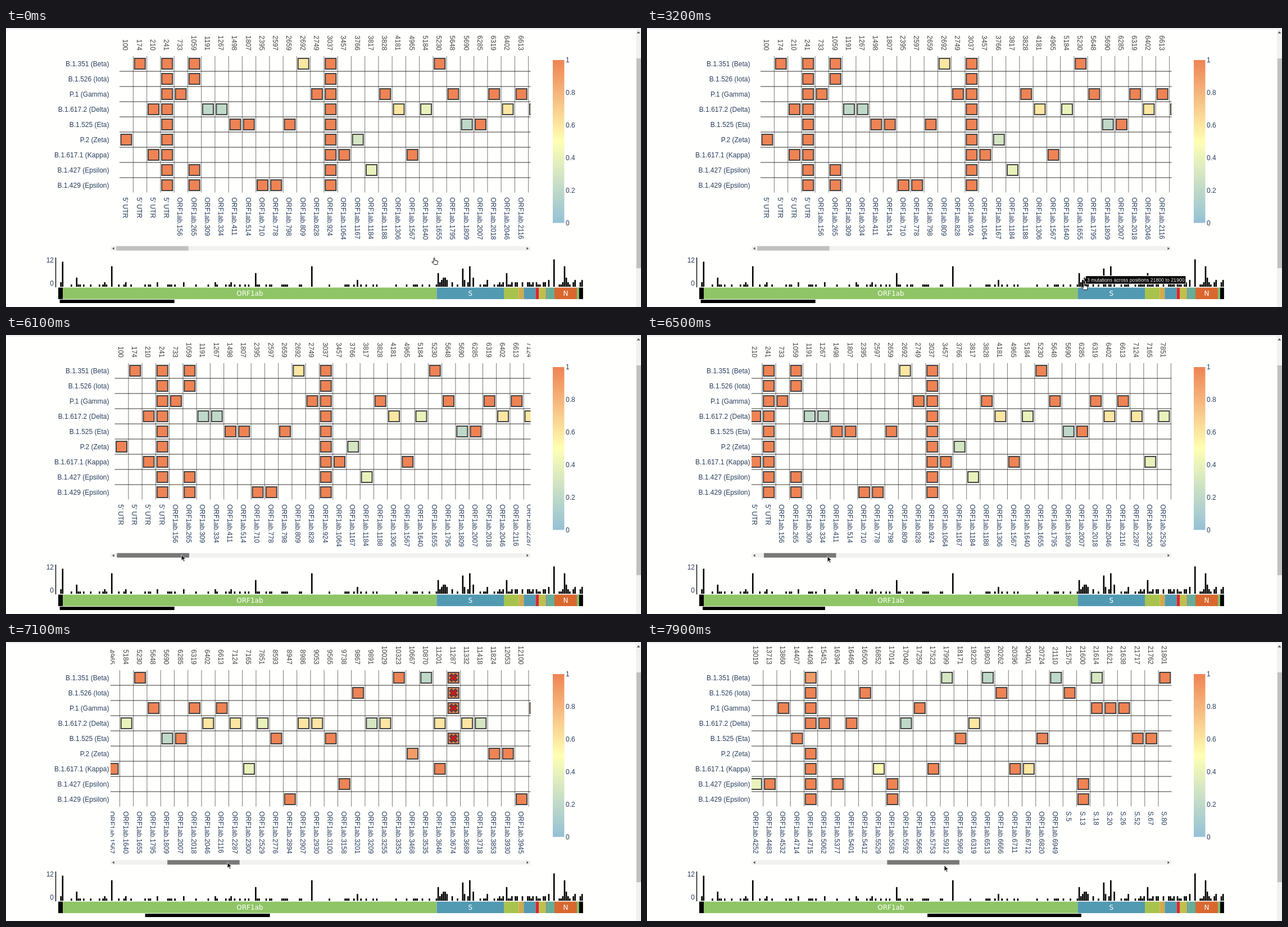
An HTML page for the animation above (8000 ms loop, 1130x496 px).

```html
<!DOCTYPE html>
<html lang="en">
<head>
<meta charset="utf-8">
<title>Mutation heatmap</title>
<style>
  html, body { margin: 0; width: 100%; height: 100%; overflow: hidden; background: #fffffd; }
  svg { display: block; font: 12px "Liberation Sans", Arial, sans-serif; fill: #2a3f5f; }
  .end { text-anchor: end; }
  .gene { text-anchor: middle; fill: #fff; font-family: "DejaVu Sans", sans-serif; }
  .pos { fill: #444; }
  .cell { stroke: #444; stroke-width: 2; }
  .cross { fill: #dc1414; stroke: #444; stroke-width: 1.8; }
  .col { stroke: #777; }
  .row { stroke: #333; }
  .track { fill: #f1f1f1; }
  .arrow { fill: #505050; }
  #tip path { fill: #000; stroke: #fff; }
  #tip text { fill: #fff; font-size: 8.75px; }
  #hand { fill: #fff; stroke: #111; }
  #pointer { fill: #111; stroke: #fff; stroke-width: .8; }
</style>
</head>
<body>
<svg width="1130" height="496" viewBox="0 0 1130 496">
  <defs>
    <clipPath id="view"><rect x="186" y="0" width="747.5" height="386"/></clipPath>
    <linearGradient id="scale" x1="0" y1="0" x2="0" y2="1">
      <stop offset="0" stop-color="#ef8354"/>
      <stop offset=".5" stop-color="#ffffb4"/>
      <stop offset="1" stop-color="#94c0d6"/>
    </linearGradient>
  </defs>
  <rect y="1" width="1121" height="1" fill="#ddd"/>
  <rect class="track" x="1121" width="9" height="496"/>
  <rect x="1122" y="54" width="8" height="373" fill="#c1c1c1"/>
  <path class="arrow" d="M1122.5 9.5l3-3.5 3 3.5z"/>
  <g id="names"></g>
  <g clip-path="url(#view)"><g id="grid"></g></g>
  <rect x="973" y="57" width="20.5" height="289.5" fill="url(#scale)"/>
  <g id="ticks"></g>
  <rect class="track" x="186" y="387.7" width="747" height="8"/>
  <path class="arrow" d="M192.5 389.5v5l-3.5-2.5zM926.5 389.5v5l3.5-2.5z"/>
  <rect id="thumb" y="387.7" width="128.5" height="8"/>
  <text class="end" x="85" y="417">12</text>
  <text class="end" x="85" y="457.5">0</text>
  <path d="M88.5 408V461" stroke="#111" stroke-width="1.5"/>
  <g id="bars"></g>
  <g id="genes"></g>
  <rect id="span" y="483" height="6" fill="#000"/>
  <g id="tip">
    <path d="M0 0l3.5-3v-4.2h178.5v14.4h-178.5v-4.2z"/>
    <text x="6" y="3.2"></text>
  </g>
  <path id="hand" d="M4 7.5V1.6a1 1 0 0 1 2 0V5.2l4 .7q1.8.3 1.6 2l-.6 2.4-.8 2.2H5L1 8.3q-.4-1.1.9-1L4 8.6z"/>
  <path id="pointer" d="M0 0V10.5L2.5 8.2 4.2 12 6 11.2 4.3 7.5H7.5z"/>
</svg>
<script>
const $ = id => document.getElementById(id);

const lineages = ["B.1.351 (Beta)", "B.1.526 (Iota)", "P.1 (Gamma)", "B.1.617.2 (Delta)", "B.1.525 (Eta)",
  "P.2 (Zeta)", "B.1.617.1 (Kappa)", "B.1.427 (Epsilon)", "B.1.429 (Epsilon)"];

// position:lineages (a-i); a digit gives the frequency in tenths, x marks a deletion
const columns = `100:f 174:a 210:dg 241:abcdefghi 733:c 1059:abhi 1191:d2 1267:d2 1498:e 1807:e
  2395:i 2597:i 2659:e 2692:a6 2749:c 3037:abcdefghi 3457:g 3766:f3 3817:h4 3828:c
  4181:d6 4965:g 5184:d4 5230:a 5648:c 5690:e2 6285:e 6319:c 6402:d6 6613:c
  7124:d6 7165:g4 7851:d4 8593:e 8947:i 8986:d6 9053:d6 9565:e 9738:h 9867:b
  9891:d3 10029:d6 10323:a 10667:f9 10870:a2 11201:d6g 11287:axbxcxex 11332:d6 11418:d3 11824:f
  12053:f 12100:i 12778:c 12878:i 12964:f9 13019:h4 13713:h 13860:c 14407:e 14408:a9bcdfghi
  15451:d 16394:h 16466:d 16500:b 16852:g5 17014:hi 17040:d2 17259:c 17523:g 17999:a3
  18171:e 19220:d6 19803:a2 20262:b 20396:g 20401:g6 20724:e 21110:a2 21575:b 21600:hi
  21614:a3c 21621:c 21638:c 21717:e 21762:e 21801:a`.split(/\s+/).map(entry => {
    const [pos, list] = entry.split(":");
    const cells = [...list.matchAll(/([a-i])(\d?)(x?)/g)].map(([, row, tenths, cross]) =>
      ({ row: row.charCodeAt(0) - 97, value: tenths ? tenths / 10 : 1, cross }));
    return { pos: +pos, cells };
  });

// each gene runs from the end of the one before
const genes = [[266, "#000"], [21563, "#8fc566", "ORF1ab"], [25393, "#5299b2", "S"], [26245, "#a8c34d"],
  [26523, "#d3a94a"], [27202, "#5299b2"], [27394, "#d42a2e"], [27770, "#bfc04c"], [27894, "#7b9f8f"],
  [28274, "#63ae98"], [29558, "#d9682f", "N"], [29680, "#7fbf6f"], [29903, "#000"]];

const peaks = { 218: 3, 219: 4, 220: 4, 221: 3, 230: 8, 234: 9, 236: 4, 255: 6, 282: 12, 288: 9, 289: 4 };
const LAST_BIN = 298;

const STEP = 24.25, LEFT = 214, TOP = 63.5, ROW = 27, SHOWN = 30;
const genomeX = pos => 93 + pos * 0.03123;
const rowY = i => TOP + i * ROW;
const barTop = n => 460 - 4.05 * n;
const clamp = k => Math.min(1, Math.max(0, k));
const mix = (a, b, k) => a + (b - a) * k;

function colour(v) {
  const low = [148, 192, 214], mid = [255, 255, 180], high = [239, 131, 84];
  const [a, b, k] = v < .5 ? [low, mid, v * 2] : [mid, high, v * 2 - 1];
  return `rgb(${a.map((c, i) => Math.round(mix(c, b[i], k)))})`;
}

function site(pos) {
  if (pos < 266) return "5' UTR";
  const [name, start] = pos < 21563 ? ["ORF1ab", 266] : ["S", 21563];
  return `${name}.${Math.floor((pos - start) / 3) + 1}`;
}

const rect = (x, y, w, h, fill) => `<rect x="${x}" y="${y}" width="${w}" height="${h}" fill="${fill}"/>`;
const turned = (x, y, cls, text) => `<text class="${cls}" transform="translate(${x} ${y}) rotate(90)">${text}</text>`;

function cellMark({ row, value, cross }, x) {
  const plus = "M-2.4-7.2h4.8v4.8h4.8v4.8h-4.8v4.8h-4.8v-4.8h-4.8v-4.8h4.8z";
  return `<g transform="translate(${x} ${rowY(row)})">
    <rect class="cell" x="-9.5" y="-9.5" width="19" height="19" fill="${colour(value)}"/>
    ${cross && `<path class="cross" transform="rotate(45)" d="${plus}"/>`}</g>`;
}

function drawGrid() {
  const rules = columns.map((_, i) => `<path class="col" d="M${LEFT + 12.4 + i * STEP} 50V292.5"/>`);
  const lines = lineages.slice(1).map((_, i) => `<path class="row" d="M202 ${rowY(i + .5)}h${columns.length * STEP}"/>`);
  const marks = columns.map(({ pos, cells }, i) => {
    const x = LEFT + i * STEP;
    return cells.map(c => cellMark(c, x)).join("")
      + turned(x - 5.6, 40, "end pos", pos) + turned(x - 5.6, 301, "", site(pos));
  });
  $("grid").innerHTML = [...rules, ...lines, ...marks].join("");
}

function countBins() {
  const bins = Array(LAST_BIN + 1).fill(0);
  for (const { pos, cells } of columns) bins[Math.floor(pos / 100)] += cells.length;
  let seed = 7;
  const random = () => (seed = seed * 16807 % 2147483647) / 2147483647;
  for (let bin = 218; bin <= LAST_BIN; bin++) {
    const small = random() < .55 ? 1 + Math.floor(random() * 2.2) : 0;
    bins[bin] = peaks[bin] || small;
  }
  return bins;
}

function drawGenes() {
  let x = genomeX(0);
  $("genes").innerHTML = genes.map(([end, fill, name]) => {
    const from = x, w = genomeX(end) - x;
    x += w;
    return rect(from, 461.5, w, 20.5, fill)
      + (name ? `<text class="gene" x="${from + w / 2}" y="475.5">${name}</text>` : "");
  }).join("");
}

const counts = countBins();
$("bars").innerHTML = counts.map((n, bin) =>
  rect(genomeX(bin * 100 + 50) - 1.3, barTop(n), 2.6, 460 - barTop(n), "#000")).join("");
$("names").innerHTML = lineages.map((n, i) => `<text class="end" x="183.5" y="${rowY(i) + 4}">${n}</text>`).join("");
$("ticks").innerHTML = [1, .8, .6, .4, .2, 0].map(v => `<text x="996" y="${350.7 - v * 289.5}">${v}</text>`).join("");
drawGrid();
drawGenes();

// from ms, to ms, x, y reached
const moves = [[200, 400, 752, 421], [500, 900, 763, 452], [1000, 1100, 764, 453], [1400, 1500, 766, 454],
  [1700, 2100, 769.5, 453], [2400, 2800, 772.7, 453], [3400, 3500, 774, 453], [3900, 4000, 775, 453],
  [4500, 4600, 746.5, 429.5], [4600, 4900, 580, 399], [5000, 5600, 315, 389], [5700, 5900, 311, 390]];

// ms, cursor x, cursor y, scroll
const drag = [[6000, 311, 390, 0], [6500, 321, 393, 70], [7100, 394, 391.5, 533.2],
  [7600, 497, 398.5, 1114.2], [7900, 529, 397, 1353.4]];

function moved(t) {
  return moves.reduce(([x, y], [from, to, nx, ny]) => {
    const k = clamp((t - from) / (to - from));
    return [mix(x, nx, k), mix(y, ny, k)];
  }, [757, 408]);
}

// smooth curve through the keys
function glide(keys, t) {
  const last = keys.length - 1;
  const i = Math.min(last, Math.max(1, keys.findIndex(k => k[0] > t) + 1 || last + 1) - 1) || 1;
  const a = keys[i - 1], b = keys[i], len = b[0] - a[0];
  const u = clamp((t - a[0]) / len);
  const slope = (n, c) => {
    const p = keys[Math.max(0, n - 1)], q = keys[Math.min(last, n + 1)];
    return (q[c] - p[c]) / (q[0] - p[0]) * len;
  };
  return a.slice(1).map((v, j) => mix(v, b[j + 1], u * u * (3 - 2 * u))
    + u * (1 - u) * ((1 - u) * slope(i - 1, j + 1) - u * slope(i, j + 1)));
}

const place = (id, x, y) => $(id).setAttribute("transform", `translate(${x} ${y})`);
const show = (id, on) => $(id).style.display = on ? "" : "none";

function render(t) {
  const onChart = t < 4900;
  const [dragX, dragY, scroll] = glide(drag, t);
  const [x, y] = t < 6000 ? moved(t) : [dragX, dragY];
  place(onChart ? "hand" : "pointer", x, y);
  show("hand", onChart);
  show("pointer", !onChart);

  place("grid", -scroll, 0);
  $("thumb").setAttribute("x", 196 + scroll / 5.85);
  $("thumb").setAttribute("fill", t < 5600 ? "#c1c1c1" : t < 5900 ? "#a8a8a8" : "#787878");

  const first = Math.floor(scroll / STEP);
  const from = genomeX(columns[first].pos), to = genomeX(columns[first + SHOWN - 1].pos);
  $("span").setAttribute("x", from - .5);
  $("span").setAttribute("width", to - from + .7);

  // the fingertip touches a bar
  const bin = Math.floor((x + 4 - genomeX(0)) / genomeX(100) * 0 + (x + 4 - 93) / 3.123);
  const touching = onChart && counts[bin] > 0 && y >= barTop(counts[bin]);
  show("tip", touching);
  if (touching) {
    place("tip", genomeX(bin * 100 + 50) + 1.5, barTop(counts[bin]));
    $("tip").lastElementChild.textContent =
      `${counts[bin]} mutations across positions ${bin * 100} to ${bin * 100 + 100}`;
  }
}

const began = performance.now();
function tick() {
  const t = (performance.now() - began) % 8000;
  render(Math.floor(t / 100) * 100);
  requestAnimationFrame(tick);
}
tick();
</script>
</body>
</html>
```
